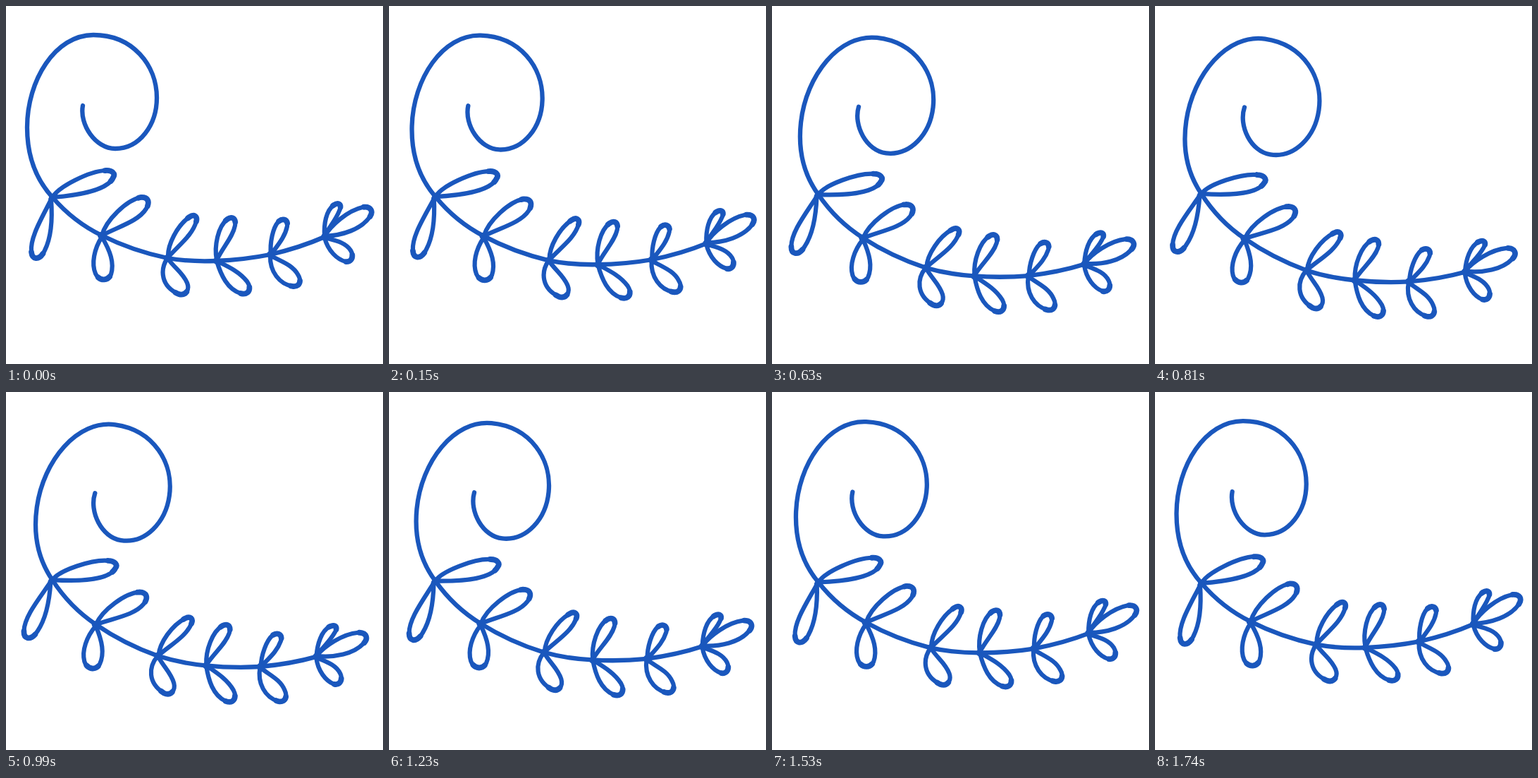
An HTML page for the animation above (1770 ms loop, 535 by 507 pixels).

```html
<!DOCTYPE html>
<html lang="en">
<head>
<meta charset="utf-8">
<title>Swaying sprig</title>
<style>
  html, body { margin: 0; width: 100%; height: 100%; overflow: hidden; background: #fff; }
  svg { display: block; width: 100%; height: 100%; }
  #sprig { fill: none; stroke: #1a57bd; stroke-linecap: round; stroke-linejoin: round; }
</style>
</head>
<body>
<svg viewBox="0 0 535 507">
  <defs>
    <g id="leaves">
      <path pathLength="100" d="M66 271C74 256 118 234 141 233C150 232 156 237 152 243C145 260 105 268 66 271"/>
      <path pathLength="100" d="M64 274C66 300 64 328 55 346C49 360 37 361 36 348C34 328 50 302 64 274"/>
      <path pathLength="100" d="M136 325C142 303 171 275 191 271C203 270 204 279 199 287C188 305 158 313 136 325"/>
      <path pathLength="100" d="M136 327C148 347 154 364 149 380C145 390 132 390 127 379C121 365 125 344 136 327"/>
      <path pathLength="100" d="M230 356C229 338 243 311 260 299C267 294 272 298 270 305C265 324 246 338 230 356"/>
      <path pathLength="100" d="M229 357C218 374 220 397 245 408C255 411 261 402 257 392C251 378 240 372 229 357"/>
      <path pathLength="100" d="M299 360C295 340 301 312 314 302C321 297 327 301 325 311C322 327 308 341 299 360"/>
      <path pathLength="100" d="M299 361C305 381 314 401 333 407C345 410 349 400 342 390C331 376 315 369 299 361"/>
      <path pathLength="100" d="M376 352C374 335 379 314 386 306C393 299 401 303 399 312C396 327 386 338 376 352"/>
      <path pathLength="100" d="M375 353C374 376 388 394 407 397C417 398 420 389 414 380C406 366 390 362 375 353"/>
      <path pathLength="100" d="M452 326C451 309 454 290 465 282C473 277 477 282 473 290C468 303 458 314 452 326"/>
      <path pathLength="100" d="M452 326C461 311 484 290 506 285C518 283 522 291 516 299C504 316 478 325 452 326"/>
      <path pathLength="100" d="M452 328C457 347 470 359 482 362C491 363 494 354 489 346C481 334 466 332 452 328"/>
    </g>
  </defs>
  <g id="sprig">
    <!-- curl and stem -->
    <path stroke-width="6.3" d="M109 141C104 168 127 202 155 202C190 202 214 168 214 130C214 84 180 41 124 41C70 41 30 105 30 172C30 212 43 246 66 271C85 293 109 312 136 325C164 339 196 350 229 357C252 361 275 362 298 361C324 360 350 357 375 352C401 346 427 338 452 327"/>
    <use href="#leaves" stroke-width="6.2"/>
    <!-- heavier leaf tips -->
    <use href="#leaves" stroke-width="7.8" stroke-dasharray="0 43 13 100"/>
    <!-- joints -->
    <path stroke-width="10" d="M66 271h0M135 325h0M229 357h0M299 361h0M375 352h0M452 327h0"/>
  </g>
</svg>
<script>
  const LOOP = 1770, STEP = 30, SWING = 9, PIVOT = "101 267";
  const sprig = document.getElementById("sprig");
  const start = performance.now();

  function draw(now) {
    const elapsed = Math.max(0, now - start) % LOOP;
    const t = Math.floor(elapsed / STEP) * STEP;
    const angle = SWING * (1 - Math.abs(1 - 2 * t / LOOP));
    sprig.setAttribute("transform", `rotate(${angle} ${PIVOT})`);
    requestAnimationFrame(draw);
  }
  draw(start);
</script>
</body>
</html>
```
